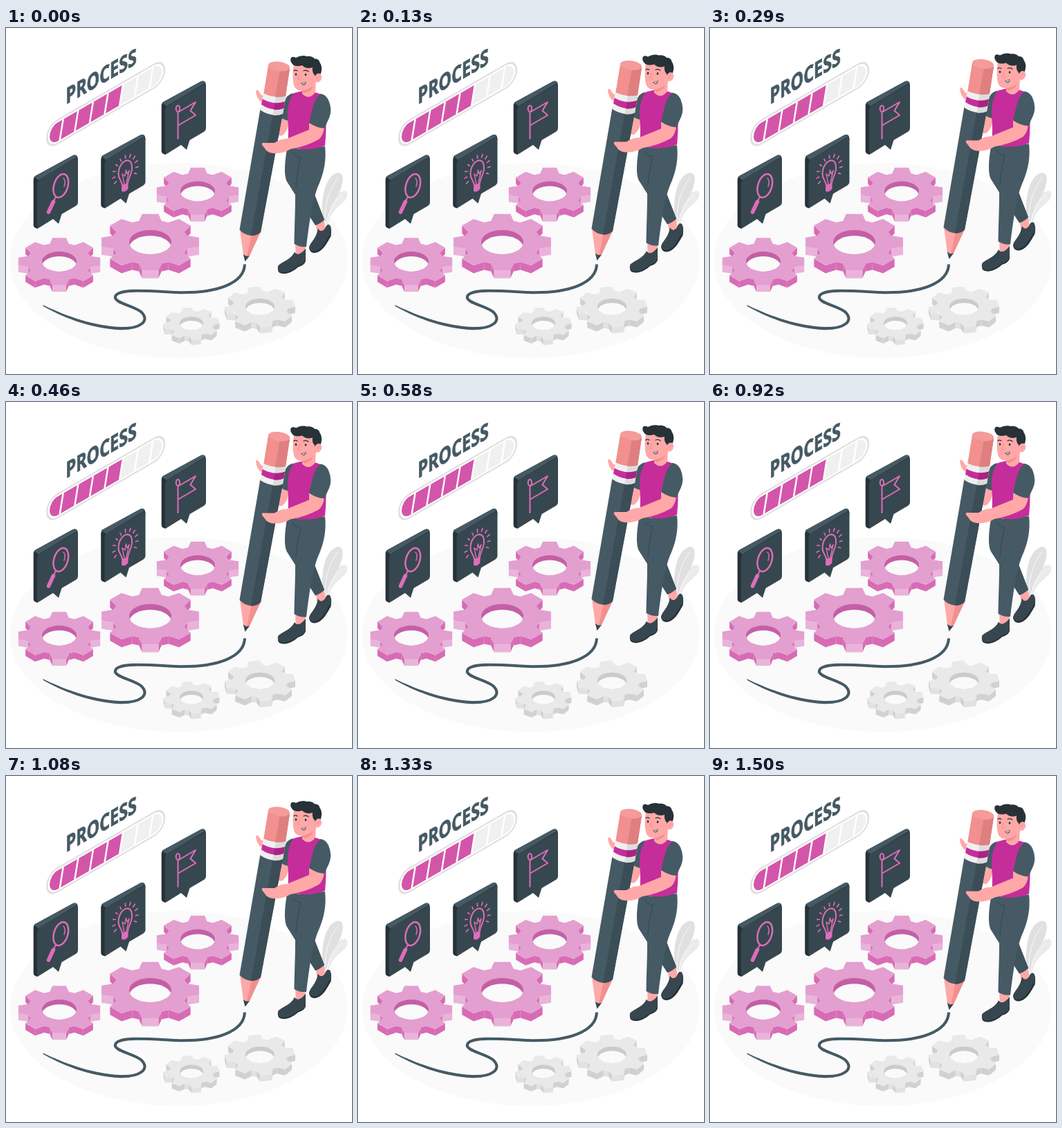
Recreate the animation shown at these times as an HTML page. Size 500 by 500 pixels, loop 1540 ms.

```html
<!DOCTYPE html>
<html lang="en">
<head>
<meta charset="utf-8">
<style>
html, body { margin: 0; height: 100%; overflow: hidden; background: #fff }
svg { display: block; width: 100vw; height: 100vh }
text { font: 700 32px "Open Sans", "Noto Sans", sans-serif; fill: #455a64; stroke: #455a64; stroke-width: .9 }
.icon { fill: none; stroke: #dc6fb9; stroke-width: 2; stroke-linecap: round; stroke-linejoin: round }
.dark { fill: #263238 } .slate { fill: #37474f } .blue { fill: #455a64 }
.skin { fill: #ffa8a7 } .blush { fill: #f28f8f } .pink { fill: #c52d9a }
.line { fill: none; stroke-linecap: round }
</style>
</head>
<body>
<svg viewBox="0 0 500 500">
  <defs>
    <clipPath id="fill"><rect x="63" y="-13.5" width="162" height="27" rx="11.7" ry="13.5"/></clipPath>
    <g id="sign">
      <path class="dark" d="M39.700 219Q39.700 215.500 42.500 213.700L97 184Q101 182.500 103 185.500L104 190L46 290Q39.700 289 39.700 285Z"/>
      <path class="blue" d="M40.500 215Q41.500 214 42.500 213.700L97 184Q101 182.500 103.300 186L47 220Z"/>
      <path class="slate" d="M45 225Q45 221.500 48 219.500L100 189Q104 186.500 104 190V252Q104 255 101 257L80.500 269L76 283L68 276L48 288.500Q45 290 45 286Z"/>
    </g>
  </defs>

  <ellipse cx="249.500" cy="336" rx="244" ry="141" fill="#fafafa"/>

  <text transform="matrix(.73 -.42 0 1 86.500 110.500)">PROCESS</text>
  <g transform="matrix(1 -.577 0 1 0 193)">
    <rect x="59.300" y="-17" width="169.500" height="34" rx="14.800" ry="17" fill="#fff" stroke="#e0e0e0" stroke-width="2.500"/>
    <g clip-path="url(#fill)">
      <path fill="#f0f0f0" d="M60-14H230V14H60Z"/>
      <path fill="#d355aa" d="M60-14H169.500L164.500 14H60Z"/>
      <path id="ticks" stroke="#fff" stroke-width="2.700"/>
    </g>
  </g>

  <use href="#sign"/>
  <use href="#sign" x="97.500" y="-29.500"/>
  <use href="#sign" x="185" y="-107"/>
  <g class="icon">
    <ellipse cx="79.300" cy="228" rx="10" ry="17.500" transform="rotate(17 79.300 228)" stroke-width="2.500"/>
    <path d="M83 217Q87 221 84 229" stroke-width="1.500"/>
    <path d="M72 244L69 250"/>
    <path d="M68.500 251L61.500 266" stroke-width="5.500"/>
    <path d="M168 228C168 220 162.500 220 162.500 211C162.500 201 168 193 174 191.500C180 190.500 182.500 196 182 204C181 214 176 217 176 225Z"/>
    <path d="M168 230L175.500 226V232Q172 237 168 235Z" fill="#dc6fb9"/>
    <path d="M171 226L168 211L172 214L173.500 205L175 211L178 206L174 224" stroke-width="1.400"/>
    <path id="rays" stroke-width="1.700"/>
    <ellipse cx="248.400" cy="116.500" rx="2.700" ry="4.500"/>
    <path d="M248.500 121V160M250 121L274 107L266.500 119.500L274 126L250 140"/>
  </g>

  <g id="gears"></g>

  <path class="blue" d="M53.500 400.300C78 412 120 430 165 432V436.200C120 434.500 78 416 53.500 401.800Z"/>
  <path d="M164 434.100C195 435 209 423 195 410C184 401 155 397 158 388C162 376 205 380 245 382C305 384 344 369 345 341.500" fill="none" stroke="#455a64" stroke-width="4.100"/>

  <path fill="#ebebeb" d="M462 285C464 258 475 235 490 235.500C495 237 494 244 490 249C482 258 470 262 465 285Z"/>
  <path fill="#e0e0e0" d="M458 278C454 245 462 214 478 209.500C486 208 488 215 486 224C482 245 467 254 463 280Z"/>
  <path fill="none" stroke="#fafafa" d="M461 276C461 250 469 229 480 217M464 281C467 261 476 248 487 241"/>

  <g id="man">
    <!-- far leg and shoe -->
    <path class="skin" d="M447 278L459 274L462 291L450 298Z"/>
    <path class="dark" d="M438.500 320C436 312 448 308 451 290Q455 297 461 290Q464 282 468 285Q471 291 469.500 301C464 310 458 324 446 325Q440 325 438.500 320Z"/>
    <path class="slate" d="M439 319C437 311 448 307 451 290Q455 297 461 290Q464 282 468 285Q471 290 469 297C463 306 457 321 446 322.500Q440 323 439 319Z"/>
    <path class="blue" d="M407 170C403 190 401 212 406 222L418 241L447 285Q455 282 460 277L444 236L440 180Z"/>
    <path d="M420 239L434 263L447 285Q455 282 460 277L444 236Z" fill="#3f535d"/>
    <!-- near leg and shoe -->
    <path class="skin" d="M418 311L433 314L432 331L419 331Z"/>
    <path class="dark" d="M393 349C391 340 410 338 417 324Q422 332 433 319V337Q431 343 422 345.500C413 354 402 357 396 354Q393 352.500 393 349Z"/>
    <path class="slate" d="M393 347C391 339 410 338 417 324Q422 332 433 319V335Q431 341 422 343.500C413 351.500 402 355 396 352Q393 350.500 393 347Z"/>
    <path class="blue" d="M421 175L461 171C463 190 460 207 453 224C445 241 440 266 434 316Q425 317 416.500 312C417 283 418 265 418 244C418 225 420 205 425 189Z"/>
    <path class="line" stroke="#37474f" d="M414 180Q418 187 426 187Q421 205 419 230"/>
    <!-- far arm -->
    <path class="skin" d="M397 126L410 131Q408 148 400 155Q394 157 389 153Z"/>
    <path class="blue" d="M415 94Q405 96 402 108L396 128Q402 134 411 134Z"/>
    <path class="skin" d="M377 111C367 108 362 101 361 91Q363 88 365 91L369 97L378 98Z"/>
    <!-- shirt and neck -->
    <path class="pink" d="M416 94L428 91L447 93L459 97Q465 125 461 170Q435 180 407 171Q409 150 407 130Q406 106 416 94Z"/>
    <path class="skin" d="M428 84L448 76L447 93Q438 105 428 95Z"/>
    <path class="blush" d="M428 90Q438 89 444 82Q443 92 430 94Z"/>
    <!-- head -->
    <path class="skin" d="M416 53C414 65 414 78 417 85C421 92 429 91 437 88C444 85 449 79 451 73L450 52Q432 45 416 53Z"/>
    <path class="dark" d="M416 54Q410 49 411.500 44Q413 40 419 43Q427 38.500 435 41Q442 40 446 44.500Q452 44 453.500 50Q458 56 455 66L450 69Q447 73 446 68Q442 64 443 57Q434 60 428 54Q422 56 416 54Z"/>
    <ellipse class="skin" cx="451" cy="72" rx="5" ry="6.500" transform="rotate(18 451 72)"/>
    <path class="line" stroke="#f28f8f" d="M449 74Q450 70 453 70"/>
    <path class="line" stroke="#263238" stroke-width="1.200" d="M416 62Q418 60 421 62M430 62Q434 60 437 63"/>
    <ellipse class="dark" cx="419" cy="67" rx="1.300" ry="1.800"/>
    <ellipse class="dark" cx="433" cy="67.500" rx="1.300" ry="1.800"/>
    <path class="line" stroke="#f28f8f" d="M424 67L421.500 74L425 75"/>
    <path class="dark" d="M426 79.500Q430 80 433.500 77.500Q433.500 82 430 82.500Q428 82 426 79.500Z"/>
    <path fill="#fff" d="M427 80Q430 80 433 78.500Q433 80 430 81.500Z"/>
    <!-- pencil -->
    <path class="skin" d="M338 291L343 328Q347 332 352 329L368 295Z"/>
    <path class="blush" d="M355 297L348 331L352 329L368 294Z"/>
    <path class="slate" d="M342.800 327Q347 331 352.200 329L345.500 337.500Z"/>
    <path class="blue" d="M367.500 117L400 123L368 295Q362 300.500 354 300Q344 299 337.500 291.500Z"/>
    <path fill="#3b4d56" d="M386 122L400 123L368 295Q362 300.500 354 300Z"/>
    <path fill="#f0f0f0" d="M372 94L404.500 98L400 124Q383 129 367.300 118.500Z"/>
    <path fill="#dcdcdc" d="M389.500 100L404.500 98L400 124Q394 127 385.500 126Z"/>
    <path class="pink" d="M370.700 102.500Q386 111.500 403 106.500L401.300 116Q384 121 369 110.500Z"/>
    <path fill="#a82384" d="M388.500 109Q396 109 403 106.500L401.300 116Q394 119 387 118Z"/>
    <path class="blush" d="M379 54L410 59L404 98.500Q388 102 372.300 94.500Z"/>
    <path fill="#e07f7f" d="M396 60L410 59L404 98.500Q397 100.500 389 99.500Z"/>
    <ellipse fill="#f59b9a" cx="394.500" cy="55.500" rx="15.700" ry="6.700" transform="rotate(8 394.500 55.500)"/>
    <!-- near arm -->
    <path class="skin" d="M438 137L460 142Q459 155 452 161Q434 171 411 175Q400 182 386 181Q377 180 374 174L370 169Q369 165 374 166L388 166Q396 160 406 160L438 147Z"/>
    <path class="blue" d="M454.500 95Q462 96 466 104Q472 118 467 130L460 145Q448 144 438 137L443 116Q446 102 454.500 95Z"/>
  </g>
</svg>
<script>
const $ = id => document.getElementById(id);
const rad = deg => deg * Math.PI / 180;
const LOOP = 1540, PEAK = 710, RISE = 9.2;

$('ticks').setAttribute('d', [...Array(7)].map((_, i) => `M${82.7 + i * 21.6}-14l-5 28`).join(''));

// Short rays on a skewed ring around the bulb
$('rays').setAttribute('d', [...Array(11)].map((_, i) => {
  const a = rad(150 + i * 24);
  const at = r => {
    const x = r * .86 * Math.cos(a);
    return `${172.5 + x} ${206.5 + r * Math.sin(a) * 1.05 - x * .45}`;
  };
  return `M${at(17.5)}L${at(21.5)}`;
}).join(''));

function gear(x, y, r, depth, hole, turn, [top, front, side, wall]) {
  const profile = [[-17, .78], [-9.5, 1], [9.5, 1], [17, .78]];
  const points = [];
  for (let k = 0; k < 8; k++)
    for (const [a, s] of profile) {
      const t = rad(turn + k * 45 + a);
      points.push([x + r * s * Math.cos(t), y + r * s * Math.sin(t) * .577]);
    }
  // Walls facing the viewer are lighter than slanted ones
  const walls = points
    .map((p, i) => ({ p, q: points[(i + 1) % points.length] }))
    .filter(({ p, q }) => q[0] < p[0])
    .sort((a, b) => a.p[1] + a.q[1] - b.p[1] - b.q[1])
    .map(({ p, q }) => {
      const slope = Math.abs((q[1] - p[1]) / (q[0] - p[0]));
      return `<path fill="${slope < .2 ? front : side}" d="M${p}L${q}v${depth}L${p[0]} ${p[1] + depth}Z"/>`;
    });
  const ry = hole * .577, drop = depth * .36;
  const w = hole * Math.sqrt(1 - (drop / ry) ** 2);
  const arc = `A${hole} ${ry} 0 0 1`;
  return walls.join('') +
    `<path fill="${top}" d="M${points.join('L')}Z"/>
     <ellipse cx="${x}" cy="${y}" rx="${hole}" ry="${ry}" fill="${wall}"/>
     <path fill="#fafafa" d="M${x - w} ${y + drop}${arc} ${x + w} ${y + drop}${arc} ${x - w} ${y + drop}Z"/>`;
}

const pink = ['#e39fd0', '#e9b3da', '#d86bb5', '#c45fa5'];
const gray = ['#e9e9e9', '#e2e2e2', '#d1d1d1', '#cbcbcb'];
$('gears').innerHTML =
  gear(277, 236, 60, 9.5, 25, 0, pink) +
  gear(77, 337.5, 60, 9.5, 25, 0, pink) +
  gear(208.5, 309.5, 71.5, 11.5, 30.5, 0, pink) +
  gear(367, 403, 51, 9, 21, -10, gray) +
  gear(268, 427, 40.5, 8, 17, -10, gray);

// Steady rise and fall
function draw(now) {
  const t = (now + LOOP / 2 - PEAK) % LOOP;
  const lift = RISE * (1 - Math.abs(2 * t / LOOP - 1));
  $('man').setAttribute('transform', `translate(0 ${.7 - lift})`);
  requestAnimationFrame(draw);
}
draw(performance.now());
</script>
</body>
</html>
```
